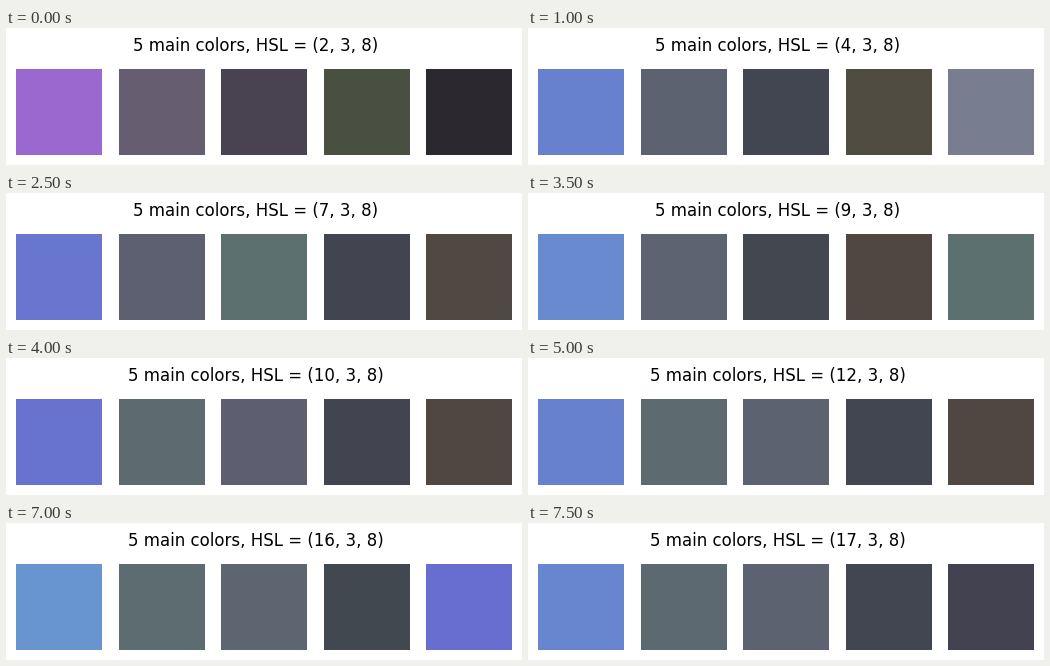
A matplotlib script for the animation above (8 s loop, 516 by 137 pixels).

```python
import colorsys

import matplotlib.pyplot as plt
from matplotlib.animation import FuncAnimation
from matplotlib.patches import Rectangle

W, H, DPI = 516, 137, 100
S_BINS, V_BINS = 3, 8
SIZE, PITCH, LEFT, TOP = 86, 102.6, 10, 41

# letter -> (saturation bin, value bin)
TONES = {"A": (1, 6), "B": (0, 3), "C": (0, 2), "D": (0, 1), "E": (0, 4)}

# number of hue bins -> dominant bins, each a tone letter and a hue bin
PALETTES = {
    2: "A1 B1 C1 C0 D1",
    3: "A1 B1 C1 C0 C2",
    4: "A2 B2 C2 C0 E2",
    5: "A3 B2 C3 B3 C0",
    6: "A3 B3 C3 C0 C4",
    7: "A4 B4 B3 C4 C0",
    8: "A4 B4 C5 C4 A5",
    9: "A5 B5 C5 C0 B4",
    10: "A6 B5 B6 C6 C0",
    11: "A6 B6 B5 C6 C0",
    12: "A7 B6 B7 C7 C0",
    13: "A7 B7 C8 A8 C7",
    14: "A8 B7 B8 C8 C9",
    15: "A9 B8 B9 C9 C10",
    16: "A9 B8 B9 C9 A10",
    17: "A10 B9 B10 C10 C11",
}


def bin_color(code, hue_bins):
    """RGB at the centre of a histogram bin."""
    s, v = TONES[code[0]]
    hue = (int(code[1:]) + 0.5) / hue_bins
    return colorsys.hsv_to_rgb(hue, (s + 0.5) / S_BINS, (v + 0.5) / V_BINS)


fig = plt.figure(figsize=(W / DPI, H / DPI), dpi=DPI, facecolor="white")
ax = fig.add_axes([0, 0, 1, 1])
ax.set(xlim=(0, W), ylim=(H, 0))
ax.axis("off")

swatches = [
    ax.add_patch(Rectangle((round(LEFT + PITCH * k), TOP), SIZE, SIZE, lw=0))
    for k in range(5)
]
title = ax.text(250, 23, "", fontsize=12, family="DejaVu Sans",
                ha="center", va="baseline")


def update(i):
    hue_bins = i + 2
    title.set_text(f"5 main colors, HSL = ({hue_bins}, {S_BINS}, {V_BINS})")
    for swatch, code in zip(swatches, PALETTES[hue_bins].split()):
        swatch.set_facecolor(bin_color(code, hue_bins))
    return [title, *swatches]


anim = FuncAnimation(fig, update, frames=len(PALETTES), interval=500,
                     repeat=True, repeat_delay=0)
plt.show()
```
